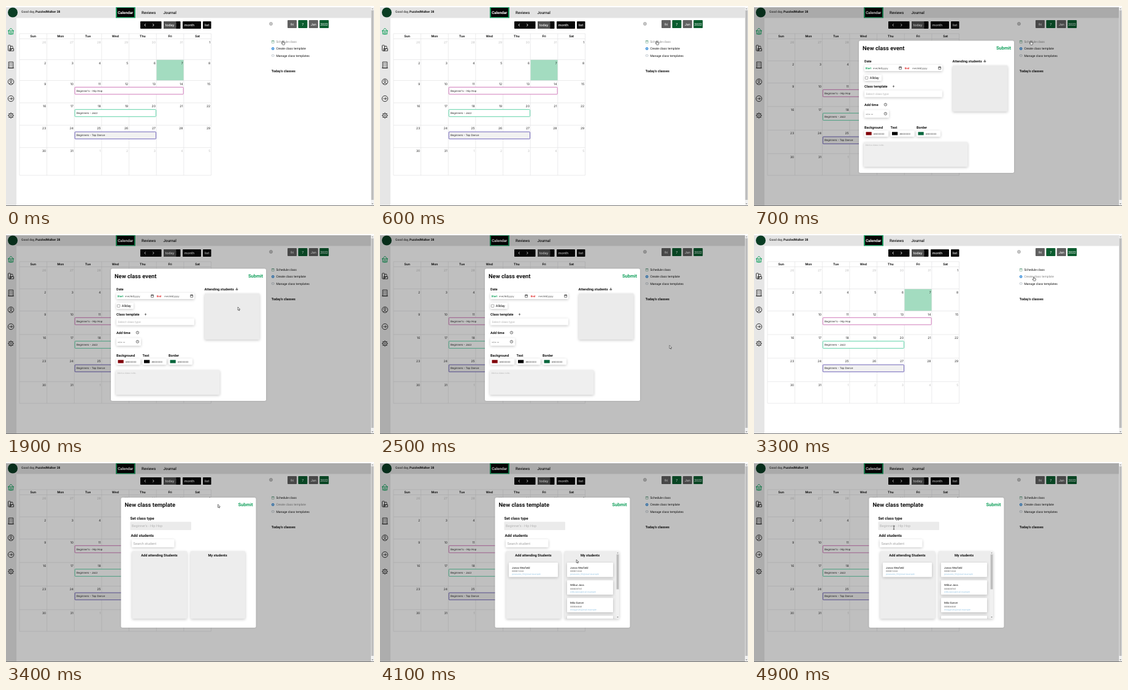
An HTML page with a canvas for the animation above (5 s loop, 600 px wide and 326 px high).

```html
<!DOCTYPE html>
<html lang="en">
<head>
<meta charset="utf-8">
<title>Class calendar</title>
<style>
html, body { margin: 0; width: 100%; height: 100%; overflow: hidden; background: #fff; }
canvas { display: block; width: 600px; height: 326px; }
</style>
</head>
<body>
<canvas id="stage"></canvas>
<script>
const canvas = document.getElementById('stage');
const ratio = window.devicePixelRatio || 1;
canvas.width = 600 * ratio;
canvas.height = 326 * ratio;
const ctx = canvas.getContext('2d');

const LOOP = 5000, STEP = 100;
const EVENT_OPEN = 700, EVENT_CLOSE = 2600, TEMPLATE_OPEN = 3400;
const STUDENTS_LOADED = 3500, STUDENT_ADDED = 3800;
const UI = 'Roboto, sans-serif', ROUND = 'Inter, sans-serif';
const GREEN = '#0a5c2e', MINT = '#12a05c', INK = '#222';
const COL = 312.5 / 7, LEFT = 22;

const START = { x: 451.5, y: 57 };
const MOVES = [
  { from: 700, to: 1200, x: 378, y: 119 },
  { from: 2200, to: 2500, x: 472, y: 181.5 },
  { from: 2700, to: 3200, x: 456.3, y: 70 },
  { from: 3300, to: 3400, x: 345.5, y: 69 },
  { from: 3400, to: 3800, x: 343, y: 172 },
  { from: 3900, to: 4600, x: 228, y: 107 }
];

const STUDENTS = [
  ['Jonas Wexfield', '0000012244', 'jonaswex_02@mail.example'],
  ['Wilbur Joss', '0000038765', 'wilburjoss@mail.example'],
  ['Milo Garver', '0000046848', 'milogarver@mail.example'],
  ['', '', '']
];

function box(x, y, w, h, fill, radius = 0) {
  ctx.fillStyle = fill;
  ctx.beginPath();
  ctx.roundRect(x, y, w, h, radius);
  ctx.fill();
}

function raised(x, y, w, h, fill = '#fff', radius = 1) {
  ctx.save();
  ctx.shadowColor = 'rgba(0,0,0,.22)';
  ctx.shadowBlur = 4 * ratio;
  ctx.shadowOffsetY = 1.2 * ratio;
  box(x, y, w, h, fill, radius);
  ctx.restore();
}

function frame(x, y, w, h, color, width = 1, radius = 0) {
  ctx.strokeStyle = color;
  ctx.lineWidth = width;
  ctx.beginPath();
  ctx.roundRect(x, y, w, h, radius);
  ctx.stroke();
}

function line(color, width, ...points) {
  ctx.strokeStyle = color;
  ctx.lineWidth = width;
  ctx.beginPath();
  points.forEach(([x, y]) => ctx.lineTo(x, y));
  ctx.stroke();
}

function circle(x, y, r, color, width) {
  ctx.beginPath();
  ctx.arc(x, y, r, 0, Math.PI * 2);
  ctx.fillStyle = ctx.strokeStyle = color;
  ctx.lineWidth = width;
  width ? ctx.stroke() : ctx.fill();
}

function at(x, y, drawing) {
  ctx.save();
  ctx.translate(x, y);
  drawing();
  ctx.restore();
}

// y is the vertical middle of the capitals
function text(str, x, y, size, { color = '#111', weight = 400, font = UI, align = 'left' } = {}) {
  ctx.font = `${weight} ${size}px ${font}`;
  ctx.textAlign = align;
  ctx.fillStyle = color;
  ctx.fillText(str, x, y + size * .36);
}

const bold = (str, x, y, size = 5.6, more = {}) => text(str, x, y, size, { weight: 700, ...more });
const hint = (str, x, y, size, color = '#aaa') => text(str, x, y, size, { color, font: ROUND });

function cross(x, y, r, color) {
  line(color, .6, [x - r, y], [x + r, y]);
  line(color, .6, [x, y - r], [x, y + r]);
}

function chevron(x, y, dir, color, width = .9) {
  line(color, width, [x - dir, y - 2], [x + dir, y], [x - dir, y + 2]);
}

function clock(x, y) {
  circle(x, y, 2.2, INK, .6);
  line(INK, .5, [x, y - 1.4], [x, y], [x + 1, y + .5]);
}

function dateIcon(x, y, color = INK) {
  frame(x - 1.9, y - 1.7, 3.8, 3.8, color, .6);
  box(x - 1.9, y - 1.9, 3.8, 1.2, color);
}

function gear(r, color) {
  circle(0, 0, r * .78, color, .9);
  circle(0, 0, r * .32, color, .7);
  for (let a = 0; a < 8; a++) {
    const c = Math.cos(a * Math.PI / 4) * r, s = Math.sin(a * Math.PI / 4) * r;
    line(color, 1.1, [c * .78, s * .78], [c * 1.06, s * 1.06]);
  }
}

function scrollbar(x, y, h, thumbH) {
  box(x, y, 5, h, '#f1f1f1');
  box(x + .6, y + 5, 3.8, thumbH, '#bdbdbd');
  box(x + 1.6, y + 2.2, 1.8, 1, '#777');
  box(x + 1.6, y + h - 3.2, 1.8, 1, '#555');
}

const SIDE_ICONS = [
  function home() {
    line(MINT, 1, [-5, 0], [0, -4.6], [5, 0]);
    frame(-3.6, -.5, 7.2, 5.3, MINT);
    frame(-1.3, 1.5, 2.6, 3.3, MINT, .9);
  },
  function swatches() {
    frame(-4.4, -4.5, 3.8, 9, INK, .9, .8);
    line(INK, .9, [-.6, -2], [2, -3.5], [3.5, -.8], [-.6, 4]);
    frame(-2, 1, 6.5, 3.6, INK, .9);
  },
  function building() {
    frame(-3.7, -4.8, 7.4, 9.8, INK, .9);
    for (let i = 0; i < 6; i++) box(-2.2 + i % 2 * 2.9, -3 + (i >> 1) * 2.2, 1.4, 1, INK);
    line(INK, .9, [-5, 5], [5, 5]);
  },
  function user() {
    circle(0, 0, 4.7, INK, .9);
    circle(0, -1.2, 1.7, INK, .8);
    line(INK, .8, [-3, 3.4], [0, 1.6], [3, 3.4]);
  },
  function next() {
    circle(0, 0, 4.7, INK, .9);
    line(INK, .9, [-2.5, 0], [2.3, 0]);
    chevron(1.4, 0, 1, INK);
  },
  () => gear(4.5, INK)
];

function drawChrome() {
  box(0, 2, 595, 17.5, '#e3e3e3');
  box(0, 19, 17, 307, '#e6e6e6');
  SIDE_ICONS.forEach((icon, i) => at(8, 41 + i * 27.5, icon));
  circle(11, 10.5, 8, '#0a3d24');
  text('Good day,', 25, 9.6, 5);
  bold('PuzzledWalker 38', 48, 9.6, 5);
  box(179, 2, 32, 17.5, '#1d9d60');
  box(181, 3, 28, 15, '#050505');
  bold('Calendar', 182.2, 10.4, 6.25, { color: '#fff' });
  text('Reviews', 221, 10.4, 6.25, { weight: 500 });
  text('Journal', 256.6, 10.4, 6.25, { weight: 500 });
}

function drawToolbar() {
  const button = (label, x, w) => {
    box(x, 25, w, 12, '#080808', .8);
    if (label === 'today') box(x, 25, w - 7, 12, '#515151', .8);
    text(label, x + 2.8, 31.2, 5.4, { color: '#fff', font: ROUND, weight: 500 });
  };
  button('', 219, 34.5);
  chevron(226.8, 31, -1, '#fff');
  chevron(240.2, 31, 1, '#fff');
  button('today', 257, 27.5);
  button('month', 288, 30);
  button('list', 321, 13.5);
}

function rowTops(settled) {
  const plain = settled ? 36 : 34, tops = [53.5];
  for (let row = 0; row < 5; row++) tops.push(tops[row] + plain + (row > 1 ? 2.4 : 0));
  return [...tops, 276];
}

function drawCalendar(settled) {
  const rows = rowTops(settled), grid = '#e2e2e4';
  box(LEFT + 5 * COL, rows[1], COL, rows[2] - rows[1], '#a3dcc0');
  for (let i = 0; i < 8; i++) line(grid, .7, [LEFT + i * COL, 45], [LEFT + i * COL, 276]);
  [45, ...rows].forEach(y => line(grid, .7, [LEFT, y], [LEFT + 7 * COL, y]));
  ['Sun', 'Mon', 'Tue', 'Wed', 'Thu', 'Fri', 'Sat'].forEach((day, i) =>
    bold(day, LEFT + (i + .5) * COL, 49.6, 5, { font: ROUND, align: 'center' }));
  for (let i = 0; i < 42; i++) {
    const day = i - 5, inside = day > 0 && day < 32;
    text((day + 30) % 31 + 1, LEFT + (i % 7 + 1) * COL - 1.4, rows[Math.floor(i / 7)] + 5.2, 5,
      { color: inside ? INK : '#bdbdbd', font: ROUND, align: 'right' });
  }
  const lesson = (row, days, name, color, fill = '#fff') => {
    const x = LEFT + 2 * COL + 1, y = rows[row] + 10.8, w = days * COL - 1.7;
    box(x, y, w, 11.6, fill, .8);
    frame(x, y, w, 11.6, color, 1, .8);
    text(name, x + 2.6, y + 5.8, 4.3, { color: INK, font: ROUND });
  };
  lesson(2, 4, "Beginner's - Hip Hop", '#d07abb');
  lesson(3, 3, 'Beginners - Jazz', '#5fd3a8');
  lesson(4, 3, 'Beginners - Tap Dance', '#7165ba', '#f1f1f1');
}

function drawAside(hovered) {
  at(432, 29, () => gear(2.8, '#999'));
  ['fri', '7', 'Jan', '2022'].forEach((label, i) => {
    const x = 459 + i * 17.4;
    box(x, 23, 15, 13, i % 2 ? GREEN : '#606060', 1);
    text(label, x + 7.5, 29.7, 5.6, { color: '#fff', align: 'center' });
  });
  dateIcon(435.2, 58.3, '#6da58a');
  circle(435.2, 69.5, 2.3, '#2a86d8');
  cross(435.2, 69.5, 1.2, '#fff');
  frame(433.3, 79.4, 3.8, 2.8, '#aab4bd', .7, .8);
  ['Schedule class', 'Create class template', 'Manage class templates'].forEach((label, i) =>
    text(label, 440.4, 58.3 + i * 11.2, 5, { color: i === hovered ? '#858585' : '#111' }));
  bold("Today's classes", 432.8, 106);
}

function modal(x, y, w, h, title) {
  ctx.save();
  ctx.shadowColor = 'rgba(0,0,0,.15)';
  ctx.shadowBlur = 3 * ratio;
  box(x, y, w, h, '#fff', 2.5);
  ctx.restore();
  bold(title, x + 6, y + 12, 9.375);
  bold('Submit', x + w - 5, y + 11.5, 7.5, { color: MINT, align: 'right' });
}

function drawEventModal() {
  const x = 180;
  modal(171, 56.5, 253, 215.5, 'New class event');
  bold('Date', x, 89.7);
  raised(x, 96, 127, 10);
  ['Start', 'End'].forEach((label, i) => {
    const left = x + 1.5 + i * 64.2;
    bold(label, left, 101.2, 4.375, { color: i ? '#e02828' : MINT });
    hint('mm/dd/yyyy', left + 12.6, 101.2, 4.1, '#444');
    dateIcon(left + 57, 101);
  });
  raised(x, 112, 28, 10);
  frame(x + 1.4, 115, 4.4, 4.4, '#777', .6, .6);
  text('Allday', x + 8.8, 117, 5.5);
  bold('Class template', x, 130.7);
  cross(227.5, 131, 1.7, INK);
  raised(x, 137.5, 127, 11);
  hint('Select class type', x + 2.6, 143.2, 4.6);
  bold('Add time', x, 160.7);
  clock(214.4, 160.7);
  raised(x, 169.5, 40, 12.5);
  text('--:-- --', x + 2.3, 175.7, 5.4);
  clock(214.4, 175.5);
  ['Background', 'Text', 'Border'].forEach((label, i) => {
    const left = x + i * 42.5;
    bold(label, left, 198.2);
    raised(left, 203, 39, 10);
    box(left + 2.5, 205.3, 9.2, 5.2, ['#800008', '#000', '#08663c'][i]);
    hint('#800000', left + 15, 208.2, 4, '#444');
  });
  raised(x - 1, 222, 169.5, 40, '#efefef');
  hint('Add a class note..', x + 1.5, 226.8, 3.8, '#b8b8b8');
  bold('Attending students', 323.6, 89.7);
  circle(376.3, 88.6, .9, '#555');
  box(374.3, 89.8, 4, 1.8, '#555', .8);
  raised(324, 97, 89.5, 75, '#ebebeb');
}

function studentCard(x, y, w, [name, phone, mail]) {
  raised(x, y, w, 23.5);
  text(name, x + 5, y + 8, 4.375);
  text(phone, x + 5, y + 14, 3.4, { color: '#555' });
  text(mail, x + 5, y + 18.7, 3.75, { color: '#70b1dc', weight: 300 });
}

function drawTemplateModal(t) {
  const loaded = t >= STUDENTS_LOADED, top = 145.5, height = 110;
  modal(187.5, 58, 220, 212, 'New class template');
  bold('Set class type', 202.4, 92, 6.25);
  box(202.4, 97.5, 99.6, 13.5, '#ebebeb', 1);
  text("Beginner's - Hip Hop", 205, 104.4, 5.6, { color: '#b4b4b4' });
  bold('Add students', 203.6, 119.7, 6.25);
  raised(205, 126, 69.5, 13);
  text('Search student', 207.6, 132.5, 5.6, { color: '#a2a2a2' });
  raised(205.5, top, 89.5, height, '#ededed');
  raised(301, top, 89, height, '#ededed');
  bold('Add attending Students', 250, 152, 5.6, { align: 'center' });
  bold('My students', loaded ? 342.5 : 345, 152, 5.6, { align: 'center' });
  if (t >= STUDENT_ADDED) studentCard(210, 164, 80, STUDENTS[0]);
  if (!loaded) return;
  ctx.save();
  ctx.beginPath();
  ctx.rect(301, top, 84, height);
  ctx.clip();
  STUDENTS.forEach((student, i) => studentCard(305, 164 + i * 28.8, 75, student));
  ctx.restore();
  scrollbar(385, top, height, 57);
}

function pointerAt(t) {
  let { x, y } = START;
  for (const move of MOVES) {
    const k = Math.min(1, Math.max(0, (t - move.from) / (move.to - move.from)));
    const ease = k * k * (3 - 2 * k);
    x += (move.x - x) * ease;
    y += (move.y - y) * ease;
  }
  return [x, y];
}

function outline(shape) {
  const path = new Path2D(shape);
  ctx.fillStyle = '#fff';
  ctx.fill(path);
  ctx.strokeStyle = INK;
  ctx.lineWidth = .6;
  ctx.stroke(path);
}

function drawPointer(t, hand) {
  at(...pointerAt(t), () => {
    if (t >= 4500) {
      [-2.8, 2.8].forEach(y => line(INK, .7, [-1.2, y], [1.2, y]));
      line(INK, .7, [0, -2.8], [0, 2.8]);
    } else {
      outline(hand ? 'M-.7 0H.6V2.3L3.4 3 2.5 6.3H-.6L-2.3 3.5-.7 4z' : 'M0 0V5.2L1.2 4.2 2 6 2.9 5.6 2.1 3.9 3.7 3.8z');
    }
  });
}

function draw(t) {
  ctx.setTransform(ratio, 0, 0, ratio, 0, 0);
  ctx.textRendering = 'geometricPrecision';
  box(0, 0, 600, 326, '#fff');
  const eventOpen = t >= EVENT_OPEN && t < EVENT_CLOSE;
  const templateOpen = t >= TEMPLATE_OPEN;
  const hovered = t < 800 ? 0 : t >= 3200 && t < 3500 ? 1 : -1;

  drawChrome();
  drawToolbar();
  drawCalendar(t >= EVENT_OPEN);
  drawAside(hovered);
  if (eventOpen || templateOpen) box(0, 2, 595, 324, 'rgba(0,0,0,.25)');
  if (eventOpen) drawEventModal();
  if (templateOpen) drawTemplateModal(t);
  scrollbar(595, 2, 323, 309);
  box(0, 325, 600, 1, '#777');
  drawPointer(t, hovered >= 0 && !templateOpen);
}

const start = performance.now();
function tick() {
  const t = (performance.now() - start) % LOOP;
  draw(Math.floor(t / STEP) * STEP);
  requestAnimationFrame(tick);
}
tick();
</script>
</body>
</html>
```
